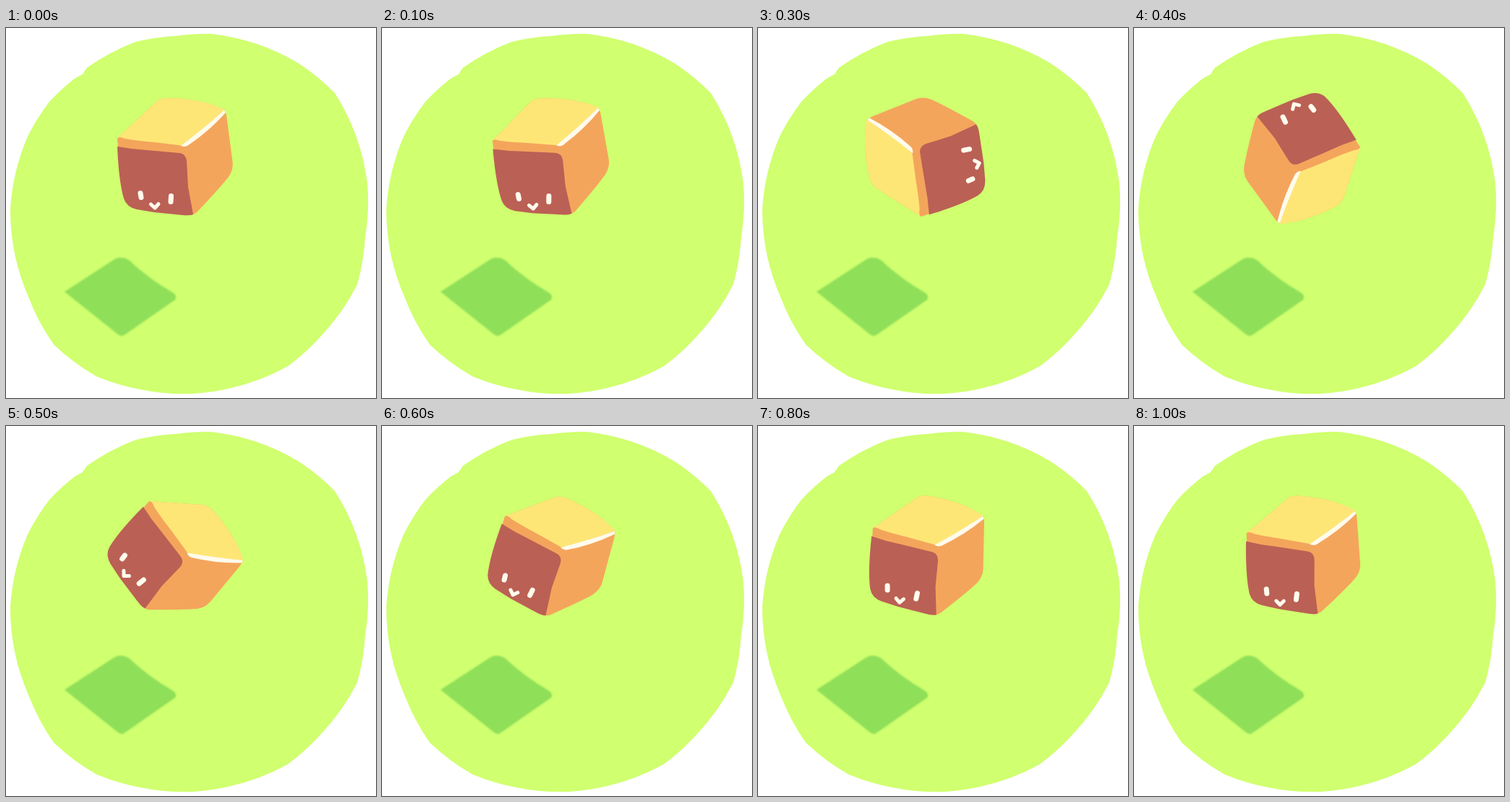
Animation of 512x512 px, one loop 1100 ms. Source, as an HTML page:

```html
<!DOCTYPE html>
<html lang="en">
<head>
<meta charset="utf-8">
<title>Rolling cube</title>
<style>
  html, body { margin: 0; width: 100%; height: 100%; overflow: hidden; background: #fff; }
  svg { display: block; width: 100vw; height: 100vh; }
</style>
</head>
<body>
<svg viewBox="0 0 512 512">
  <path id="ground" fill="#d0ff6f"/>
  <path fill="#8fdf59" style="filter:blur(.8px)" d="M81 365L147 322Q158 314 170 321Q196 346 232 367
    Q237 371 234 376L165 424Q160 428 155 424Z"/>
  <g id="cube">
    <path fill="#f4a55c" d="M154 153L160 147L208 102Q214 97 224 97Q272 98 302 113Q305 117 306 128
      L313.5 185Q315 196 308 206Q298 219 266 253Q260 260 250 259L200 250L160 215Z"/>
    <path fill="#fee676" d="M154 152L160 147L208 102Q214 97 224 97Q272 98 303 113L246 163L205 158
      Q180 156 164 153Q158 150 154 152Z"/>
    <path fill="#fffbec" d="M302 113.5L304 117Q281 143 251 163Q246 165 242 163Q275 138 302 113.5Z"/>
    <path fill="#bb6055" d="M154 164Q175 168 195 169L240 173Q249 174 250 184L252 220L259 258
      Q254 260 245 259L205 255L181 251Q167 248 163 236Q156 212 154 164Z"/>
    <g fill="none" stroke="#fffbec" stroke-linecap="round" stroke-linejoin="round" stroke-width="7">
      <path d="M186 228.5L187 234.5M228.5 232.5L228 240.5"/>
      <path stroke-width="5" d="M200.5 244L206 249L211 243.5"/>
    </g>
  </g>
</svg>
<script>
  const hold = 100, frames = 11;
  const cube = document.getElementById("cube");

  // Key points of the ground, joined by shallow arcs
  const rim = `283 8,405 49,455 90,500 215,497 290,486 355,438 424,390 468,312 498,260 506,185 500,
    125 482,66 438,31 372,6 250,30 150,60 102,95 70,106 64,112 55,180 19,235 11`.split(",");
  const arcs = [...rim.slice(1), rim[0]].map(p => `A300 300 0 0 1 ${p}`);
  document.getElementById("ground").setAttribute("d", `M${rim[0]}${arcs.join("")}`);

  // Wind up slowly, spin at constant speed, then settle back from the overshoot
  function angle(n) {
    if (n < 3) return -2.6 * n * n;
    if (n < 6) return -104.3 * (n - 2);
    return 22.6 * 0.62 ** (n - 6);
  }

  function draw(now) {
    const n = Math.floor(now / hold) % frames;
    cube.setAttribute("transform", `rotate(${angle(n)} 232 179)`);
    requestAnimationFrame(draw);
  }
  draw(performance.now());
</script>
</body>
</html>
```
